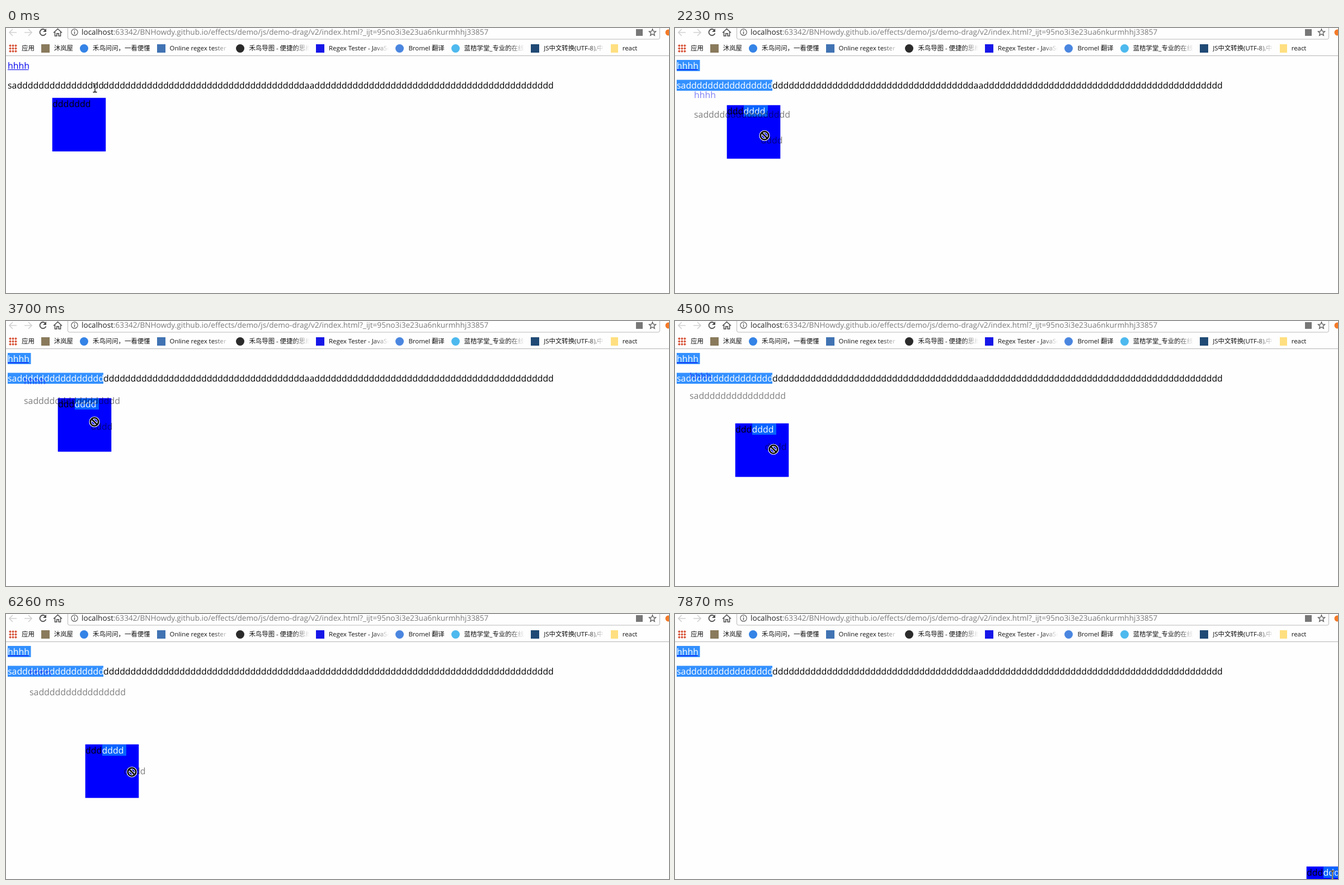
An HTML page that plays this animation: 1185 by 473 pixels, repeating every 8000 ms.

```html
<!DOCTYPE html>
<html lang="zh-CN">
<head>
<meta charset="utf-8">
<title>Drag demo</title>
<style>
  html, body { margin: 0; width: 100%; height: 100%; overflow: hidden; background: #fefefe; }
  body, svg text { font-family: "Open Sans", "Noto Sans", "Noto Sans CJK SC", "Noto Sans CJK", sans-serif; }
  #stage { position: absolute; left: 0; top: 0; width: 1185px; height: 473px; overflow: hidden; }
  svg { position: absolute; left: 0; top: 0; }
  svg text { font-size: 15.87px; white-space: pre; text-rendering: geometricPrecision; }
  svg .url { font-size: 13.6px; fill: #7b7b7b; }
  .url .host { fill: #222; }

  #marks { position: absolute; left: 5px; top: 27px; display: flex; gap: 12px; height: 18px; line-height: 18px; font-size: 11.4px; color: #111; white-space: nowrap; }
  #marks div { display: flex; flex: none; align-items: center; }
  #marks i { width: 15px; height: 15px; margin-right: 8px; }
  #marks .disc { border-radius: 50%; }
  #marks .apps { background: radial-gradient(circle, #d8593f 1.9px, transparent 2.2px) 0 0 / 5px 5px; }
  #marks span { max-width: 107.5px; overflow: hidden; }
  #marks .fade { -webkit-mask-image: linear-gradient(to left, transparent, #000 28px); mask-image: linear-gradient(to left, transparent, #000 28px); }

  .hl { fill: #3390ff; visibility: hidden; }
  #box .hl { fill: #0663ff; }
  .on .hl { visibility: visible; }
  .on .pick { fill: #fff; }
  #beam { mix-blend-mode: difference; }
</style>
</head>
<body>
<div id="stage">
  <svg width="1185" height="473" viewBox="0 0 1185 473">
    <rect width="1185" height="473" fill="#fefefe"/>

    <!-- toolbar -->
    <g fill="none" stroke-width="1.6">
      <path d="M19 8H6M12 2L6 8l6 6M33 8h13M40 2l6 6-6 6" stroke="#d2d2d2"/>
      <path d="M70.5 4.2A5.6 5.6 0 1 0 71.4 9.5" stroke="#505050" stroke-width="1.9"/>
      <path d="M72 1v6h-6z" fill="#505050"/>
      <path d="M85 8.5L92.5 1.5 100 8.5M87.5 7v7.2h3.3v-4.5h3.4v4.5h3.3V7" stroke="#505050"/>
      <path d="M110.5 0V17q0 3 3 3H1165.500q3 0 3-3V0" stroke="#b9b9b9" stroke-width="1"/>
      <circle cx="122.5" cy="7.5" r="5.7" stroke="#606060" stroke-width="1.2"/>
      <path d="M122.5 6.7v4M122.5 4v1.5" stroke="#606060"/>
      <path d="M1155.5 2l1.7 4 4.3.3-3.3 2.8 1.1 4.2-3.8-2.3-3.8 2.3 1.1-4.2-3.3-2.8 4.3-.3z" stroke="#555" stroke-width="1.3"/>
    </g>
    <rect x="1126" y="2" width="12" height="12" fill="#777"/>
    <circle cx="1184" cy="8" r="5.5" fill="#f47a28"/>
    <text class="url" x="135" y="12"><tspan class="host">localhost</tspan>:63342/BNHowdy.github.io/effects/demo/js/demo-drag/v2/index.html?_ijt=95no3i3e23ua6nkurmhhj33857</text>
    <path d="M0 49.5H1185" stroke="#b6b6b6"/>

    <!-- page -->
    <g id="words">
      <rect class="hl" x="3" y="57" width="41.5" height="20"/>
      <text class="pick" x="3" y="73" fill="#00e">hhhh</text>
      <path d="M3 74.500h37.500" stroke="#00e"/>
      <rect class="hl" x="3" y="92.500" width="171" height="19.500"/>
      <text class="pick" id="lineStart" x="3" y="108"></text>
      <text id="lineRest" x="174" y="108"></text>
    </g>
    <g id="box">
      <rect x="-.3" y="-.3" width="95.6" height="95.6" fill="#00f"/>
      <rect class="hl" x="30" width="43" height="20"/>
      <text y="16">ddd</text>
      <text class="pick" x="29.500" y="16">dddd</text>
    </g>

    <g id="ghost" opacity=".5">
      <text x="3" y="73" fill="#00e">hhhh</text>
      <text id="ghostLine" x="3" y="108"></text>
      <text id="ghostBox" x="29.500" y="16">dddd</text>
    </g>
    <path id="beam" d="M-3.500-7.500h2.500L0-6.500 1-7.500h2.500M0-6.500V6.500M-3.500 7.500h2.500L0 6.500 1 7.500h2.500" fill="none" stroke="#fff" stroke-width="1.3"/>
    <defs><path id="sign" d="M-7.200 0a7.200 7.200 0 1 0 14.400 0a7.200 7.200 0 1 0-14.400 0M-5-5L5 5"/></defs>
    <g id="ban" fill="none">
      <use href="#sign" stroke="#fff" stroke-width="4.8"/>
      <use href="#sign" stroke="#000" stroke-width="2.6"/>
    </g>
  </svg>
  <div id="marks">
    <div><i class="apps"></i><span>应用</span></div>
    <div><i style="background:#8a7a5c"></i><span>沐岚屋</span></div>
    <div><i class="disc" style="background:#3483e6"></i><span>禾鸟问问，一看便懂</span></div>
    <div><i style="background:#4173b3"></i><span class="fade">Online regex tester &nbsp;</span></div>
    <div><i class="disc" style="background:#2b2b2b"></i><span class="fade">禾鸟导图 - 便捷的思维</span></div>
    <div><i style="background:#1616e8"></i><span class="fade">Regex Tester - JavaScript</span></div>
    <div><i class="disc" style="background:#4a86e0"></i><span>Bromel 翻译</span></div>
    <div><i class="disc" style="background:#4db9ee"></i><span class="fade">蓝桔学堂_专业的在线学</span></div>
    <div><i style="background:#204a75"></i><span class="fade">JS中文转换(UTF-8),中文</span></div>
    <div><i style="background:#ffdf80;width:13px"></i><span>react</span></div>
  </div>
</div>
<script>
const $ = id => document.getElementById(id);
const d = n => "d".repeat(n);
$("lineStart").textContent = $("ghostLine").textContent = "sa" + d(16);
$("lineRest").textContent = d(37) + "aa" + d(44);

const LOOP = 8000, STEP = 130, PHASE = 50;
const GRIP = { x: 46, y: 15 };  // pointer's place inside the box

// Where the hand turns or rests: time, x, y
const turns = [
  [0, 159, 107], [300, 179, 105], [980, 119, 156], [1530, 119, 156],
  [1840, 129, 140], [2000, 129, 140], [2130, 160, 192], [2650, 186, 240], [3170, 186, 240],
  [3600, 158, 180], [3900, 158, 180], [4340, 157, 210], [4800, 224, 276],
  [5200, 186, 241], [5470, 186, 241], [6240, 229, 287], [6500, 229, 287],
  [7000, 247, 318], [7590, 251, 325], [7850, 1175, 466]
];

// Native drags; the box stays put while a ghost of the selection follows the pointer
const drags = [
  { from: 2100, to: 4060, box: { x: 93, y: 138 }, down: { x: 129, y: 140 } },
  { from: 4330, to: 5460, box: { x: 108, y: 183 }, down: { x: 153, y: 198 } },
  { from: 5760, to: 7300, box: { x: 142, y: 233 }, down: { x: 186, y: 245 } }
];

function pointerAt(t) {
  const i = turns.findIndex(turn => turn[0] > t);
  const [t1, x1, y1] = turns.at(i < 0 ? -1 : i);
  if (i < 0) return { x: x1, y: y1 };
  const [t0, x0, y0] = turns[i - 1];
  const k = (t - t0) / (t1 - t0);
  return { x: Math.round(x0 + (x1 - x0) * k), y: Math.round(y0 + (y1 - y0) * k) };
}

const minus = (a, b) => ({ x: a.x - b.x, y: a.y - b.y });
const move = (id, p) => $(id).setAttribute("transform", `translate(${p.x} ${p.y})`);
const show = (id, on) => $(id).style.display = on ? "" : "none";

function draw() {
  // The screen refreshes at a coarse, fixed pace.
  const now = performance.now() % LOOP;
  const t = Math.max(0, Math.floor((now - PHASE) / STEP) * STEP + PHASE);
  const hand = t < 150 ? pointerAt(0) : pointerAt(t);
  const drag = drags.find(({ from, to }) => t >= from && t < to);

  let box = { x: 83, y: 125 };
  if (drag) box = drag.box;
  else if (t > drags[0].from) box = minus(hand, GRIP);

  move("box", box);
  move("beam", hand);
  move("ban", hand);
  if (drag) {
    move("ghost", minus(hand, drag.down));
    move("ghostBox", box);
  }
  $("words").classList.toggle("on", t > 690);
  $("box").classList.toggle("on", t > 820);
  show("ghost", drag);
  show("ban", drag);
  show("beam", !drag);
  requestAnimationFrame(draw);
}
draw();
</script>
</body>
</html>
```
